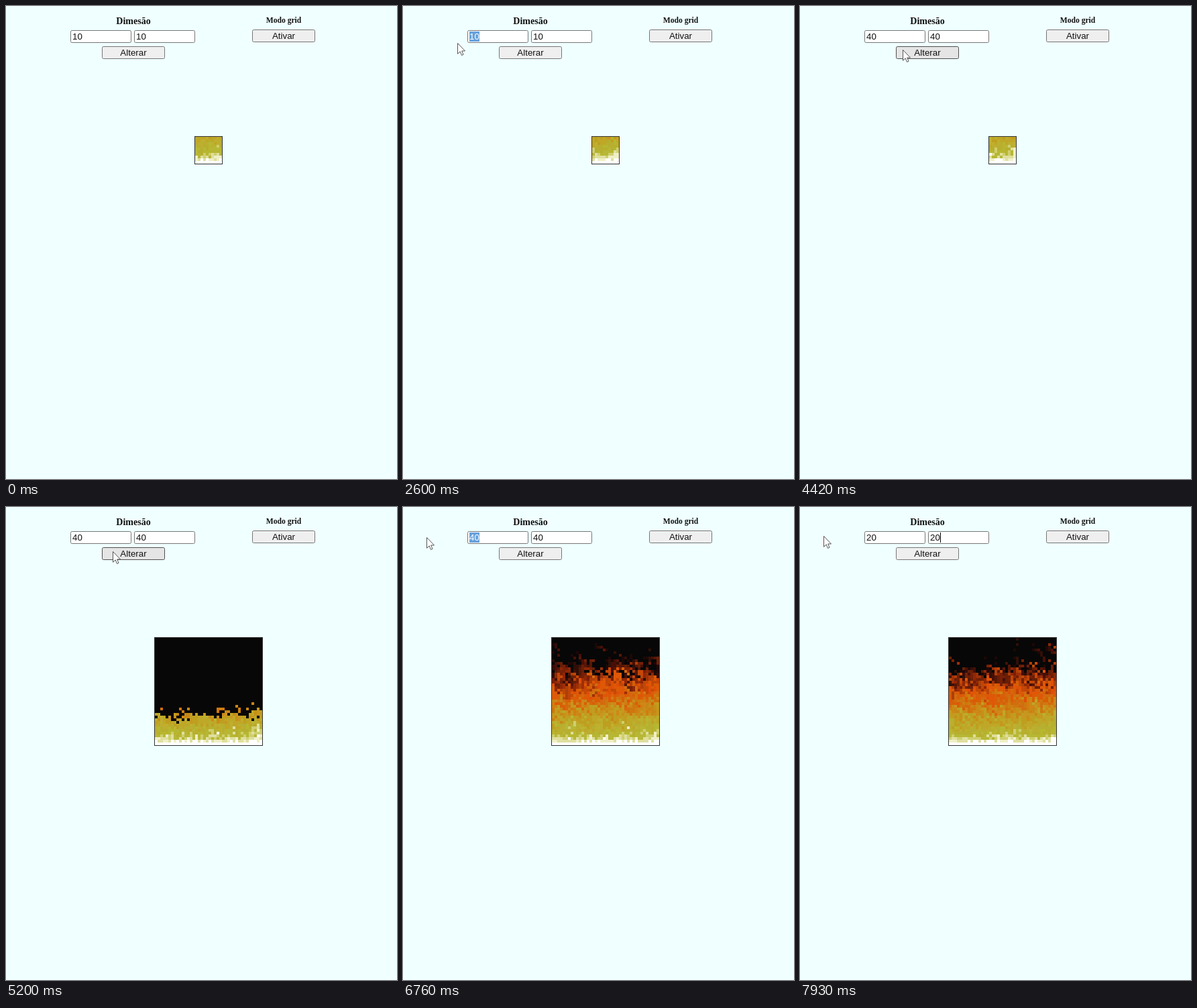
Animation, 583 px wide and 705 px high, one loop 8000 ms. Source, as an HTML page with a canvas:

```html
<!DOCTYPE html>
<html lang="pt">
<head>
<meta charset="utf-8">
<title>Fogo</title>
<style>
html, body { margin: 0; width: 100%; height: 100%; overflow: hidden; background: #f0ffff; }
body * { position: absolute; box-sizing: border-box; }
h1 { margin: 0; width: 120px; text-align: center; color: #111; white-space: nowrap;
  font: bold 14px/16px "Liberation Serif", "Times New Roman", serif; }
.box { height: 19px; border: 1px solid #767676; border-radius: 2.5px; color: #111;
  font: 13.333px/17px "Liberation Sans", Arial, sans-serif; }
.field { width: 91px; top: 36px; background: #fff; }
.field span { left: 2px; top: 1px; height: 15px; line-height: 15px; border-right: 1px solid transparent; }
.field .sel { background: #66a0dc; color: #fff; border: 0; }
.field .caret { border-color: #000; }
.button { width: 94px; background: #efefef; text-align: center; }
.hover { border-color: #4f4f4f; }
.button.hover { background: #e5e5e5; }
canvas { top: 194px; border: 1px solid #333; box-sizing: content-box; image-rendering: pixelated; }
svg { left: 0; top: 0; overflow: visible; }
</style>
</head>
<body>
<h1 style="left:130px;top:15px">Dimesão</h1>
<h1 style="left:354px;top:14px;font-size:11.62px">Modo grid</h1>
<div class="box field" style="left:96px"><span></span></div>
<div class="box field" style="left:191px"><span></span></div>
<div class="box button" style="left:143px;top:60px">Alterar</div>
<div class="box button" style="left:367px;top:35px">Ativar</div>
<canvas></canvas>
<svg width="13" height="20"><path d="M.5.5V16.3L4.2 12.9 6.5 18.5 9 17.4 6.7 12H11.5Z" fill="#fff" stroke="#555"/></svg>
<script>
const LOOP = 8000, FRAME = 130, TICK = 36, RESIZE = 4680, CELL = 4;

const palette = ('070707 1f0707 2f0f07 470f07 571707 671f07 771f07 8f2707 9f2f07 af3f07 ' +
  'bf4707 c74707 df4f07 df5707 df5707 d75f07 d75f07 d7670f cf6f0f cf770f cf7f0f cf8717 ' +
  'c78717 c78f17 c7971f bf9f1f bf9f1f bfa727 bfa727 bfaf2f b7af2f b7af2f b7b72f b7b737 ' +
  'cfcf6f dfdf9f efefc7 ffffff').split(' ').map(c => '#' + c);

// time, first value, second value, focused field, whole value selected
const edits = [
  [0, '10', '10', -1, 0],
  [1560, '10', '10', 0, 1],
  [2860, '4', '10', 0, 0],
  [3120, '40', '10', 0, 0],
  [3380, '40', '10', 1, 1],
  [3510, '40', '4', 1, 0],
  [3640, '40', '40', 1, 0],
  [RESIZE, '40', '40', -1, 0],
  [6500, '40', '40', 0, 1],
  [7020, '2', '40', 0, 0],
  [7150, '20', '40', 0, 0],
  [7410, '20', '40', 1, 1],
  [7670, '20', '2', 1, 0],
  [7800, '20', '20', 1, 0]
];

// time, x, y
const moves = [
  [0, 75, 706], [780, 113, 45], [1430, 113, 45], [1690, 81, 55], [3770, 81, 55],
  [4290, 153, 65], [5070, 153, 65], [5720, 213, 70], [5980, 213, 70],
  [6370, 113, 45], [6430, 113, 45], [6630, 35, 45], [6890, 35, 45], [7280, 35, 43]
];

const fields = [...document.querySelectorAll('.field')];
const boxes = [...document.querySelectorAll('.box')];
const canvas = document.querySelector('canvas');
const ctx = canvas.getContext('2d');
const cursor = document.querySelector('svg');
let size = 0, steps = 0, seed, fire;

function random() {
  seed = seed + 0x6D2B79F5 | 0;
  let r = Math.imul(seed ^ seed >>> 15, 1 | seed);
  r = r + Math.imul(r ^ r >>> 7, 61 | r) ^ r;
  return ((r ^ r >>> 14) >>> 0) / 2 ** 32;
}

function reset(n) {
  size = n;
  steps = 0;
  seed = n;
  fire = new Uint8Array(n * n).fill(palette.length - 1, n * (n - 1));
  canvas.width = canvas.height = n;
  canvas.style.width = canvas.style.height = n * CELL + 'px';
  canvas.style.left = 301 - n * CELL / 2 + 'px';
}

function spread() {
  for (let x = 0; x < size; x++) {
    for (let y = 0; y < size - 1; y++) {
      const i = x + size * y, decay = Math.floor(random() * 3);
      if (i >= decay) fire[i - decay] = Math.max(0, fire[i + size] - decay);
    }
  }
  steps++;
}

function drawFire(t) {
  const grown = t >= RESIZE, n = grown ? 40 : 10;
  const goal = Math.floor(grown ? (t - RESIZE) / TICK : 40 + t / TICK);
  if (n !== size || goal < steps) reset(n);
  while (steps < goal) spread();
  fire.forEach((v, i) => {
    ctx.fillStyle = palette[v];
    ctx.fillRect(i % n, Math.floor(i / n), 1, 1);
  });
}

function drawFields(t) {
  const [since, a, b, focus, selected] = edits.filter(e => e[0] <= t).pop();
  fields.forEach((field, i) => {
    const text = field.firstChild, active = i === focus;
    text.textContent = i ? b : a;
    text.classList.toggle('sel', active && !!selected);
    text.classList.toggle('caret', active && !selected && (t - since) % 1000 < 500);
  });
}

function pointer(t) {
  const k = moves.findIndex(m => m[0] > t);
  if (k < 0) return moves[moves.length - 1].slice(1);
  const [t0, x0, y0] = moves[k - 1], [t1, x1, y1] = moves[k];
  const p = (t - t0) / (t1 - t0), e = p * p * (3 - 2 * p);
  return [x0 + (x1 - x0) * e, y0 + (y1 - y0) * e].map(Math.round);
}

function drawCursor(t) {
  const [x, y] = pointer(t);
  cursor.style.transform = `translate(${x}px, ${y}px)`;
  for (const box of boxes) {
    const dx = x - box.offsetLeft, dy = y - box.offsetTop;
    box.classList.toggle('hover', dx >= 0 && dy >= 0 && dx < box.offsetWidth && dy < box.offsetHeight);
  }
  // the arrow gives way to a text beam over the fields
  cursor.style.visibility = fields.some(f => f.classList.contains('hover')) ? 'hidden' : 'visible';
}

function draw() {
  const t = Math.floor(performance.now() % LOOP / FRAME) * FRAME;
  drawFire(t);
  drawFields(t);
  drawCursor(t);
  requestAnimationFrame(draw);
}
draw();
</script>
</body>
</html>
```
